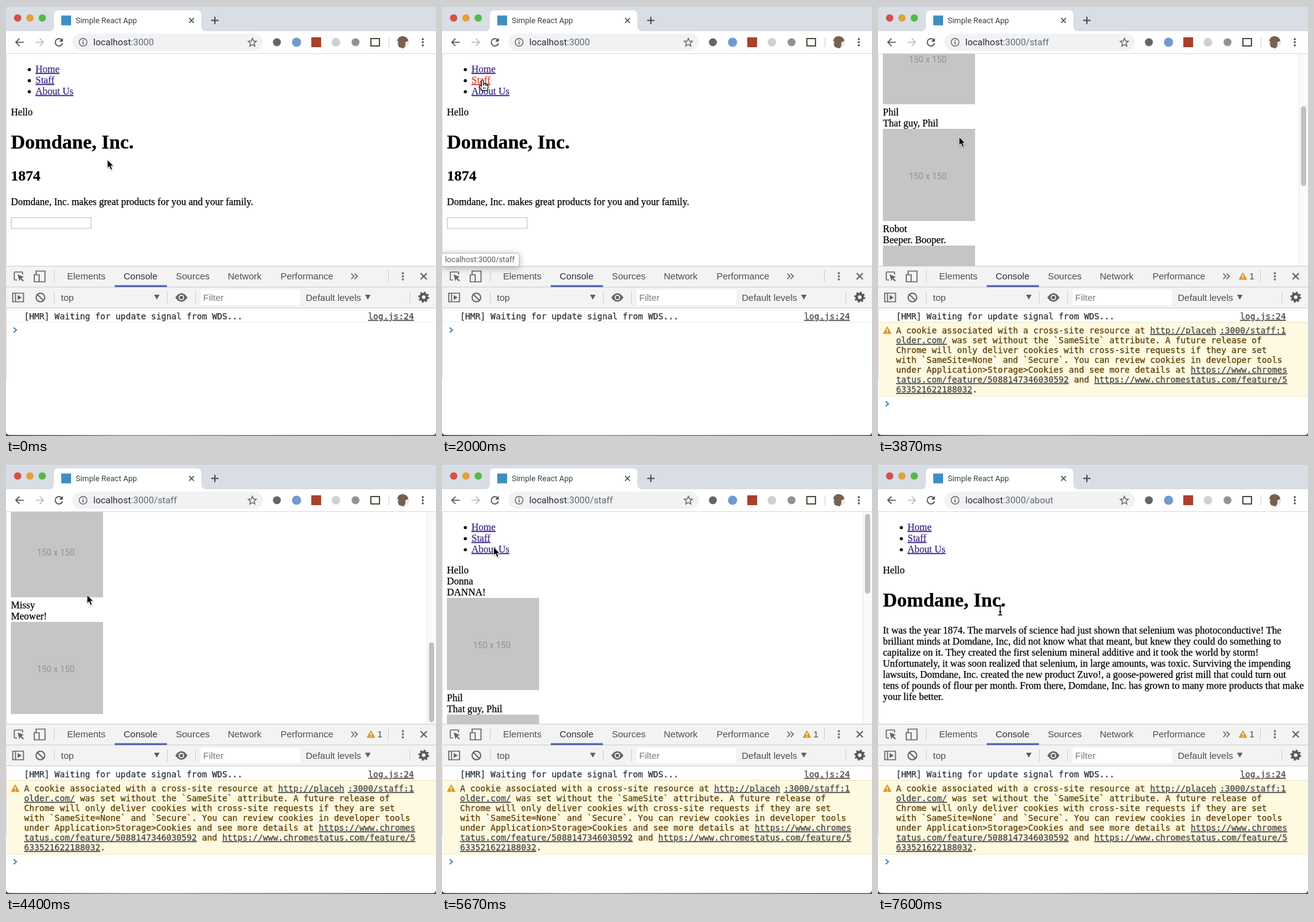
An HTML page for the animation above (8000 ms loop, 700x700 px).

```html
<!DOCTYPE html>
<html lang="en">
<head>
<meta charset="utf-8">
<title>Browser walkthrough</title>
<style>
  html, body { margin: 0; width: 100%; height: 100%; overflow: hidden; background: #fff; }
  #stage { position: relative; width: 700px; height: 700px; overflow: hidden; }
  #stage > svg { position: absolute; left: 0; top: 0; }
  text { white-space: pre; stroke-width: .25px; }
  .ui { font-family: Roboto, sans-serif; fill: #3c4043; }
  .tool { font: 15px "Liberation Sans", Arial, sans-serif; fill: #4a4d51; }
  .page { font: 16px "Liberation Serif", Times, serif; fill: #000; }
  .page text { stroke: #000; }
  .h1 { font-size: 32px; font-weight: bold; }
  .h2 { font-size: 24px; font-weight: bold; }
  .page .link { fill: #40268a; stroke: #40268a; text-decoration: underline; }
  .page .link.active { fill: #d03a26; stroke: #d03a26; }
  .page .size { font: 14px Roboto, sans-serif; fill: #929292; stroke: none; text-anchor: middle; }
  .mono { font: 13.74px "DejaVu Sans Mono", monospace; fill: #2a2f36; stroke: #2a2f36; }
  .warn { fill: #5c3c00; stroke: #5c3c00; }
  .ref { fill: #444; stroke: #444; text-decoration: underline; }
  .line { fill: none; stroke: #626568; stroke-width: 1.7; }
  .dark { stroke: #494d52; }
  .sep { stroke: #ccc; }
  #status {
    position: absolute; left: -1px; top: 402px; height: 20px; padding: 0 7px 0 5px;
    font: 12.5px/20px Roboto, sans-serif; color: #55595e; white-space: nowrap;
    background: #fff; border: 1px solid #bfbfbf; border-radius: 0 4px 0 0;
    box-shadow: 0 2px 12px rgba(0, 0, 0, .32);
  }
</style>
</head>
<body>
<div id="stage">
<svg width="700" height="700" viewBox="0 0 700 700">
  <defs>
    <linearGradient id="desk">
      <stop offset="0" stop-color="#3c3346"/><stop offset=".3" stop-color="#a58a86"/>
      <stop offset=".6" stop-color="#8d6a4c"/><stop offset="1" stop-color="#5b5368"/>
    </linearGradient>
    <g id="alert">
      <path d="M0-5.5 6 5H-6Z" fill="#e0982f" stroke="#e0982f" stroke-width="1.5" stroke-linejoin="round"/>
      <path d="M0-2.5V1.5M0 2.8V4.2" stroke="#fff" stroke-width="1.5"/>
    </g>
    <path id="cross" d="M-4-4 4 4M4-4-4 4"/>
    <g id="dots"><circle cy="-5" r="1.7"/><circle r="1.7"/><circle cy="5" r="1.7"/></g>
    <path id="drop" d="M-4.5-4H4.5L0 4Z" fill="#606060"/>
  </defs>

  <rect width="700" height="700" fill="url(#desk)"/>
  <rect width="700" height="698.5" rx="5" fill="#fff"/>

  <!-- tab strip -->
  <rect width="700" height="41" fill="#d9dde4"/>
  <path d="M0 .5H700" stroke="#c3c7ce"/>
  <circle cx="19" cy="19.5" r="6" fill="#d4504a"/>
  <circle cx="39" cy="19.5" r="6" fill="#dfa23c"/>
  <circle cx="59" cy="19.5" r="6" fill="#57b847"/>
  <path d="M70 41Q78 41 78 33V15Q78 7 86 7H310Q318 7 318 15V33Q318 41 326 41Z" fill="#fff"/>
  <rect x="90" y="15.5" width="16" height="16" fill="#3f8fbe"/>
  <text class="ui" x="113.5" y="28" font-size="12.7">Simple React App</text>
  <use href="#cross" x="302" y="23.5" class="line dark"/>
  <path d="M334 23.5H346M340 17.5V29.5" class="line dark" style="stroke-width:2"/>

  <!-- toolbar -->
  <path d="M29 59H16M22 53 16 59 22 65" class="line dark"/>
  <path d="M48 59H60M55 53 61 59 55 65" class="line" style="stroke:#b8bbbe"/>
  <path d="M91 55.5A6 6 0 1 0 92 60.5" class="line dark"/>
  <path d="M92.5 52V58H86.5Z" fill="#494d52"/>
  <rect x="108" y="45" width="310" height="28" rx="14" fill="#f0f2f4"/>
  <circle cx="125.5" cy="59" r="6.3" class="line" style="stroke-width:1.4"/>
  <path d="M125.5 58V62.5M125.5 55.2V56.8" class="line"/>
  <text class="ui" x="142" y="64" font-size="15" style="fill:#2b2e32">localhost<tspan fill="#65696d">:3000</tspan><tspan id="path" fill="#65696d"></tspan></text>
  <path d="M401 52.5 402.9 57 407.7 57.4 404 60.5 405.2 65.2 401 62.7 396.8 65.2 398 60.5 394.3 57.4 399.1 57Z" class="line" style="stroke-width:1.4"/>
  <circle cx="441" cy="59" r="6.5" fill="#62656a"/>
  <circle cx="473" cy="59" r="7.5" fill="#6f9bd2"/>
  <rect x="497" y="51" width="16" height="16" fill="#a8402c"/>
  <circle cx="537" cy="59" r="7" fill="#cfd0d6"/>
  <circle cx="569" cy="59" r="6.5" fill="#8b939b"/>
  <rect x="594" y="53" width="14" height="12" fill="none" stroke="#46543f" stroke-width="2"/>
  <path d="M623.5 51V67" class="sep"/>
  <circle cx="646" cy="59" r="10" fill="#ece8e4"/>
  <path d="M637 57Q638 49 646 49 654 50 655 57L650 59Q651 66 647 69L640 67Q637 63 639 58Z" fill="#76604f"/>
  <use href="#dots" x="678.5" y="59" fill="#505459"/>
  <path d="M0 77.5H700" stroke="#d8d9db"/>

  <!-- page -->
  <svg y="78" width="700" height="345" viewBox="0 78 700 345">
    <g id="scroller" class="page">
      <circle cx="38" cy="103.5" r="2.6"/><circle cx="38" cy="121.5" r="2.6"/><circle cx="38" cy="139.5" r="2.6"/>
      <text class="link" x="48" y="108">Home</text>
      <text class="link" id="staffLink" x="48" y="126">Staff</text>
      <text class="link" id="aboutLink" x="48" y="144">About Us</text>
      <text x="8" y="178">Hello</text>
      <g id="home">
        <text class="h1" x="8" y="232">Domdane, Inc.</text>
        <text class="h2" x="8" y="284">1874</text>
        <text x="8" y="324">Domdane, Inc. makes great products for you and your family.</text>
        <rect x="8.5" y="344.5" width="130" height="17.5" fill="#fff" stroke="#bdbdbd"/>
      </g>
      <g id="staff"></g>
      <g id="about"><text class="h1" x="8" y="232">Domdane, Inc.</text></g>
    </g>
    <g id="bar">
      <rect x="685" y="78" width="15" height="345" fill="#fafafa"/>
      <path d="M685.5 78V423" stroke="#e7e7e7"/>
      <rect id="thumb" x="688.5" y="81" width="8.5" height="130" rx="4.25" fill="#c0c0c0"/>
    </g>
  </svg>
  <path d="M.5 78V607" stroke="#ecdadd"/>

  <!-- developer tools -->
  <rect y="423" width="700" height="69" fill="#f3f3f3"/>
  <path d="M0 423.5H700M0 457.5H700M0 491.5H700" stroke="#cbcbcb"/>
  <rect x="177" y="454.5" width="85" height="3" fill="#4a5fb3"/>
  <path d="M18 446H14.5Q13.5 446 13.5 445V434Q13.5 433 14.5 433H26Q27 433 27 434V437" class="line"/>
  <path d="M19 437 29 441 25 442.8 29 447 27.5 448.5 23.5 444.3 21.8 448Z" fill="#626568"/>
  <path d="M49 437V431.5H63.5V449H55M46 437.5H54V449H46Z" class="line"/>
  <path d="M78.5 430V449M622.5 430V449M78.5 465V484M262.5 465V484M308.5 465V484M657.5 465V484" class="sep"/>
  <g class="tool">
    <text x="99.5" y="445">Elements</text>
    <text x="191.5" y="445" style="fill:#2b2e32">Console</text>
    <text x="276.5" y="445">Sources</text>
    <text x="361" y="445">Network</text>
    <text x="447" y="445">Performance</text>
    <text x="89.5" y="480">top</text>
    <text x="488" y="480">Default levels</text>
  </g>
  <path d="M562 435.5 566.5 440 562 444.5M567.5 435.5 572 440 567.5 444.5" class="line"/>
  <use href="#dots" x="646" y="440" fill="#606060"/>
  <use href="#cross" transform="translate(680 440) scale(1.25)" class="line"/>
  <path d="M11 467.5H28.5V481.5H11ZM15.5 467V482" class="line"/>
  <path d="M19 470.5 25.5 474.5 19 478.5Z" fill="#626568"/>
  <circle cx="56" cy="474.5" r="7" class="line" style="stroke-width:2"/>
  <path d="M51 469.5 61 479.5" class="line" style="stroke-width:2"/>
  <use href="#drop" x="245.5" y="474"/>
  <use href="#drop" x="589" y="474"/>
  <path d="M275.5 474.5Q285.5 460.5 295.5 474.5 285.5 488.5 275.5 474.5Z" fill="#626568"/>
  <circle cx="285.5" cy="474.5" r="3.7" fill="#626568" stroke="#f3f3f3" stroke-width="1.7"/>
  <rect x="317" y="462" width="162" height="25" fill="#fff"/>
  <text class="tool" x="321" y="480" style="fill:#777a7e">Filter</text>
  <g fill="none" stroke="#55585c">
    <circle cx="680" cy="474" r="5" stroke-width="4"/>
    <circle cx="680" cy="474" r="7.2" stroke-width="3.4" stroke-dasharray="2.83 2.825"/>
  </g>

  <!-- console -->
  <path d="M0 514.5H700" stroke="#efefef"/>
  <text class="mono" x="29.5" y="510">[HMR] Waiting for update signal from WDS...</text>
  <text class="mono ref" x="664" y="510" text-anchor="end">log.js:24</text>
  <g id="warning">
    <use href="#alert" x="594" y="440"/>
    <text class="tool" x="604.5" y="445">1</text>
    <rect x="1" y="515" width="699" height="120" fill="#fef9e1"/>
    <path d="M1 515.5H700M1 635.5H700" stroke="#f7eec6"/>
    <use href="#alert" x="15" y="528"/>
    <text class="mono ref" x="664" y="533" text-anchor="end">:3000/staff:1</text>
  </g>
  <path id="prompt" d="M12.5 523.5 17 527.5 12.5 531.5" fill="none" stroke="#3f83bd" stroke-width="1.9"/>
</svg>

<div id="status"></div>

<svg width="700" height="700" viewBox="0 0 700 700">
  <g id="cursor" style="filter:drop-shadow(0 1px 1px rgba(0,0,0,.3))">
    <path id="arrow" d="M0 0V14L3.2 11.2 5.6 16.8 8.2 15.7 5.8 10.2H10Z" fill="#000" stroke="#fff"/>
    <path id="hand" d="M-1.5 10V1Q-1.5-.5 0-.5T1.5 1V5.5Q4 4.5 4.5 6.2 6.8 5.3 7 7.2 9 6.8 9 8.8V11.5Q8.5 13.5 7.5 16.5H-.5Q-2 14-5 10.5-6 8.5-4.3 8.2-3 8.2-1.5 10ZM1.5 5.5V8.5M4.5 6.2V9M7 7.2V9.5M1.5 11.5V14M4 11.5V14" fill="#fff" stroke="#000" stroke-width="1.1" stroke-linejoin="round"/>
    <path id="beam" d="M-3-7.5Q0-7.5 0-5.5 0-7.5 3-7.5M0-5.5V6M-3 8Q0 8 0 6 0 8 3 8M-2 2.5H2" fill="none" stroke="#000" stroke-width="1.3"/>
  </g>
</svg>
</div>

<script>
const LOOP = 8000, TICK = 1000 / 15;
const $ = id => document.getElementById(id);
const show = (id, on) => { $(id).style.display = on ? "" : "none"; };

const label = (x, y, content, cls = "") => `<text class="${cls}" x="${x}" y="${y}">${content}</text>`;
const append = (id, markup) => $(id).insertAdjacentHTML("beforeend", markup);

const people = [["Donna", "DANNA!"], ["Phil", "That guy, Phil"], ["Robot", "Beeper. Booper."], ["Missy", "Meower!"]];
people.forEach(([name, bio], i) => {
  const y = 196 + i * 190;
  append("staff", label(8, y, name) + label(8, y + 18, bio) +
    `<rect x="8" y="${y + 22}" width="150" height="150" fill="#c5c5c5"/>` +
    label(81, y + 104, "150 x 150", "size"));
});

[
  "It was the year 1874. The marvels of science had just shown that selenium was photoconductive! The",
  "brilliant minds at Domdane, Inc, did not know what that meant, but knew they could do something to",
  "capitalize on it. They created the first selenium mineral additive and it took the world by storm!",
  "Unfortunately, it was soon realized that selenium, in large amounts, was toxic. Surviving the impending",
  "lawsuits, Domdane, Inc. created the new product Zuvo!, a goose-powered grist mill that could turn out",
  "tens of pounds of flour per month. From there, Domdane, Inc. has grown to many more products that make",
  "your life better."
].forEach((row, i) => append("about", label(8, 276 + i * 18, row)));

const ref = s => `<tspan class="ref">${s}</tspan>`;
[
  "A cookie associated with a cross-site resource at " + ref("http://placeh"),
  ref("older.com/") + " was set without the `SameSite` attribute. A future release of",
  "Chrome will only deliver cookies with cross-site requests if they are set",
  "with `SameSite=None` and `Secure`. You can review cookies in developer tools",
  "under Application&gt;Storage&gt;Cookies and see more details at " + ref("https://www.chromes"),
  ref("tatus.com/feature/5088147346030592") + " and " + ref("https://www.chromestatus.com/feature/5"),
  ref("633521622188032") + "."
].forEach((row, i) => append("warning", label(29.5, 533 + i * 16, row, "mono warn")));

// Every table starts its rows with a tick (1/15 s).
const moves = [
  [0, 165, 250], [6, 165, 250], [9, 66, 138], [11, 66, 138], [19, 63, 107], [22, 63, 107],
  [25, 66, 121], [44, 66, 121], [45, 69, 149], [50, 69, 149], [55, 132, 213], [82, 132, 213],
  [85, 84, 135], [91, 70, 100], [93, 70, 100], [95, 72, 139], [104, 72, 139], [114, 199, 238]
];
const scrolls = [
  [0, 0], [54, 0], [56, 50], [58, 208], [60, 410], [62, 527], [65, 527], [66, 531],
  [71, 531], [73, 490], [75, 406], [77, 120], [79, 0]
];
const cursors = [[0, "arrow"], [8, "hand"], [51, "arrow"], [87, "hand"], [107, "arrow"], [112, "beam"]];
const routes = [[0, "home"], [32, "staff"], [98, "about"]];
const hints = [
  [0, null], [12, "/about"], [15, "/staff"], [18, ""], [24, "/staff"], [46, "/about"],
  [51, null], [94, ""], [95, "/about"], [107, null]
];

const held = (table, n) => table.filter(row => row[0] <= n).pop()[1];
const smooth = k => k * k * (3 - 2 * k);
const linear = k => k;

function tween(table, n, ease) {
  const i = table.findIndex(row => row[0] > n);
  if (i < 0) return table[table.length - 1].slice(1);
  const [t0, ...from] = table[i - 1], [t1, ...to] = table[i];
  const k = ease((n - t0) / (t1 - t0));
  return from.map((v, j) => Math.round(v + (to[j] - v) * k));
}

function draw(ms) {
  const n = Math.floor((ms % LOOP + 4) / TICK) % 120;
  const route = held(routes, n);
  for (const id of ["home", "staff", "about"]) show(id, id === route);
  $("path").textContent = route === "home" ? "" : "/" + route;
  $("staffLink").classList.toggle("active", n >= 30 && n < 32);
  $("aboutLink").classList.toggle("active", n >= 97 && n < 101);

  const [top] = tween(scrolls, n, linear);
  $("scroller").setAttribute("transform", `translate(0 ${-top})`);
  $("thumb").setAttribute("y", 81 + top * 0.394);
  show("bar", route === "staff");

  const warned = n >= 33;
  show("warning", warned);
  $("prompt").setAttribute("transform", `translate(0 ${warned ? 120 : 0})`);

  const hint = held(hints, n);
  show("status", hint !== null);
  $("status").textContent = "localhost:3000" + (hint || "");

  const [x, y] = tween(moves, n, smooth), kind = held(cursors, n);
  $("cursor").setAttribute("transform", `translate(${x} ${y})`);
  for (const id of ["arrow", "hand", "beam"]) show(id, id === kind);
}

const start = performance.now();
function loop(now) {
  draw(Math.max(0, now - start));
  requestAnimationFrame(loop);
}
draw(0);
requestAnimationFrame(loop);
</script>
</body>
</html>
```
